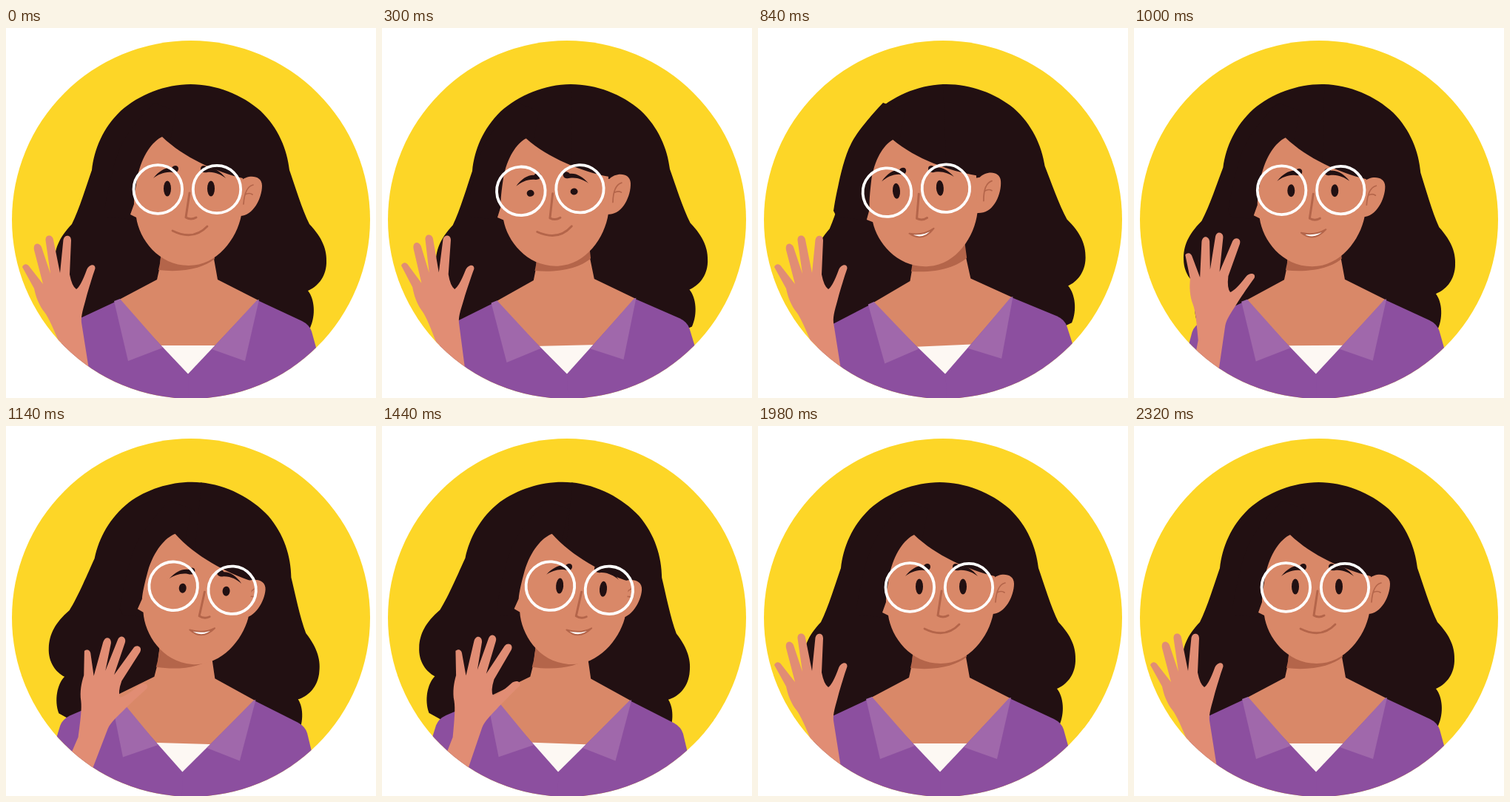
Write an HTML page that moves like this. It is 500x500 px and loops after 2340 ms.

```html
<!DOCTYPE html>
<html lang="en">
<head>
<meta charset="utf-8">
<title>Waving woman</title>
<style>
  html, body { margin: 0; width: 100%; height: 100%; overflow: hidden; background: #fff; }
  svg { display: block; width: 100%; height: 100%; }
</style>
</head>
<body>
<svg viewBox="0 0 500 500">
  <defs>
    <clipPath id="disc"><circle cx="250" cy="259" r="242"/></clipPath>
    <path id="halfHair" d="M249 76 C284 76 319 90 344 112 C368 135 380 164 383 192 C390 212 400 245 410 265 C428 284 434 300 433 318 C432 338 420 350 408 355 C417 366 419 388 411 405 L330 440 L249 440Z"/>
    <path id="shoulder" d="M340 368 L400 396 Q410 401 413 410 L424 450 L440 560 L245.5 560 L245.5 468Z"/>
    <path id="brow" d="M199 203 C207 193 216 188 224 189 C226 185 233 185 233 190 C233 195 228 196 224 195 C214 194 206 198 199 203Z"/>
  </defs>
  <g clip-path="url(#disc)">
    <rect width="500" height="510" fill="#fdd627"/>

    <g id="hair" fill="#221012">
      <use href="#halfHair"/>
      <use href="#halfHair" transform="translate(499 0) scale(-1 1)"/>
    </g>
    <path id="sideHair" fill="#221012" d="M230 112 L200 101 C184 118 165 140 157 156 C148 173 142 200 139 215 C136 228 134 240 133 247 L137 255 L200 262Z"/>

    <g id="body">
      <path fill="#d98868" d="M211 290 L208 322 L204 340 L153 367 L200 445 L290 445 L341 368 L286 340 L281 312 L279 285Z"/>
      <path fill="#b4654a" d="M210 300 L208 318 L206 327 C240 331 268 324 282 312 L280 290Z"/>
      <path fill="#fdf8f3" d="M203 429 L289 429 L246 474Z"/>
      <g fill="#8c4f9f">
        <use href="#shoulder"/>
        <use href="#shoulder" transform="translate(492 0) scale(-1 1)"/>
      </g>
      <g fill="#a068ab">
        <path d="M339 368 L342 367 L323 450 L278 434Z"/>
        <path d="M146 369 L154 366 L212 432 L165 450Z"/>
      </g>
    </g>

    <g id="head">
      <g id="ear">
        <path fill="#d98868" d="M300 208 L318 206 C326 198 346 198 346 213 C346 230 334 254 316 254 L300 254Z"/>
        <path fill="none" stroke="#b4654a" stroke-width="1.7" stroke-linecap="round" d="M334 212 C326 214 322 222 321 238 M323 225 Q329 222 333 225"/>
      </g>
      <path fill="#d98868" d="M211 147 C198 153 184 172 178 200 C175 216 173 228 173 238 L168 252 L176 256 C180 285 206 321 247 321 C285 321 312 285 318 253 L320 203 C285 195 240 175 211 147Z"/>
    </g>

    <g id="face">
      <path fill="none" stroke="#b4654a" stroke-width="3" stroke-linecap="round" stroke-linejoin="round" d="M248 223 L243 256 Q250 260 257 256"/>
      <path id="mouth" stroke="#b4654a" stroke-linecap="round" stroke-linejoin="round"/>
      <g id="brows" fill="#221012">
        <use href="#brow"/>
        <use href="#brow" transform="translate(496 0) scale(-1 1)"/>
      </g>
      <g fill="#221012">
        <ellipse class="eye" cx="218" rx="5"/>
        <ellipse class="eye" cx="277" rx="5"/>
      </g>
      <g fill="none" stroke="#fff" stroke-width="3.8">
        <circle cx="205.3" cy="218" r="32.8"/>
        <circle cx="285" cy="218" r="32.2"/>
      </g>
    </g>

    <path id="hand" fill="#e18d74" d="M22 323 C24 318 29 318 32 323 L50 346 L38 300 C36 290 45 289 48 296 L60 332 L53.5 287 C53 278 63 279 64 286 L73 331 L77.5 286 C79 279 88 279 88 287 L86 333 Q89 349 95 353 Q101 349 109 327 C112 319 121 318 120.5 325 C116 338 112 352 109 362 C105 378 101 388 102 398 L115 480 L79 480 L73 428 C64 406 58 392 52 384 C44 374 40 362 38 352 Z"/>
  </g>
</svg>
<script>
const LOOP = 2340, STEP = 20;
const $ = id => document.getElementById(id);
const eyes = document.querySelectorAll('.eye');

const span = (t, from, to) => Math.min(1, Math.max(0, (t - from) / (to - from)));
const ease = (t, from, to) => { const p = span(t, from, to); return p * p * (3 - 2 * p); };
const bump = (t, from, to) => Math.sin(Math.PI * span(t, from, to)) ** 2;

function place(id, x, y = 0, angle = 0, cx = 0, cy = 0) {
  $(id).setAttribute('transform', `translate(${x} ${y}) rotate(${angle} ${cx} ${cy})`);
}

// Two arcs that flatten and part as the closed smile opens.
function drawMouth(open) {
  const mix = (a, b) => a + (b - a) * open;
  const left = `${mix(225, 231.5)} ${mix(274, 275.5)}`;
  const right = `${mix(272, 265)} ${mix(268, 271)}`;
  const mouth = $('mouth');
  mouth.setAttribute('d', `M${left} Q${mix(253, 250)} ${mix(288, 280)} ${right} Q${mix(253, 249)} ${mix(288, 289)} ${left}Z`);
  mouth.setAttribute('fill', open > .05 ? '#fff' : 'none');
  mouth.setAttribute('stroke-width', mix(2.8, 2));
}

function draw(t) {
  // She turns to the left, swings over to the right, then faces front again.
  const cross = ease(t, 840, 1170);
  const left = ease(t, 50, 510) - cross;
  const right = cross - ease(t, 1440, 1845);
  const turn = (l, r) => l * left + r * right;
  const drop = turn(1.4, 1);

  const hairX = turn(3, 0) + 4 * bump(t, 50, 510) + 7 * bump(t, 840, 1440) - 8 * bump(t, 1440, 2160);
  const hairTurn = 5.7 * (cross - ease(t, 1440, 1760)) - 2.3 * (ease(t, 150, 640) - cross);
  place('hair', hairX, 0, hairTurn, 249, 150);

  const faceX = turn(-31, 22);
  place('sideHair', faceX);
  place('body', turn(7, -8), 0, turn(-2.5, 1.9), 246, 468);
  place('head', turn(-21.5, 10.5), drop, turn(-4.1, 4.5), 245, 250);
  place('ear', turn(6.5, -8));
  place('face', faceX, drop, turn(-3.9, 4.1), 245, 218);

  const wave = ease(t, 260, 550) - ease(t, 550, 840) + ease(t, 840, 1130) - ease(t, 1400, 1640);
  place('hand', 0, 0, 30 * wave, 99.5, 470);

  const shut = 8 * (bump(t, 220, 460) + bump(t, 960, 1200) + bump(t, 1605, 1845));
  eyes.forEach(e => {
    e.setAttribute('ry', 10.5 - shut);
    e.setAttribute('cy', 217 + shut * .75);
  });
  place('brows', 0, shut * 1.35);
  drawMouth(ease(t, 420, 640) - ease(t, 1440, 1660));
}

const start = performance.now();
function tick() {
  const t = (performance.now() - start) % LOOP;
  draw(Math.floor(t / STEP) * STEP);
  requestAnimationFrame(tick);
}
tick();
</script>
</body>
</html>
```
